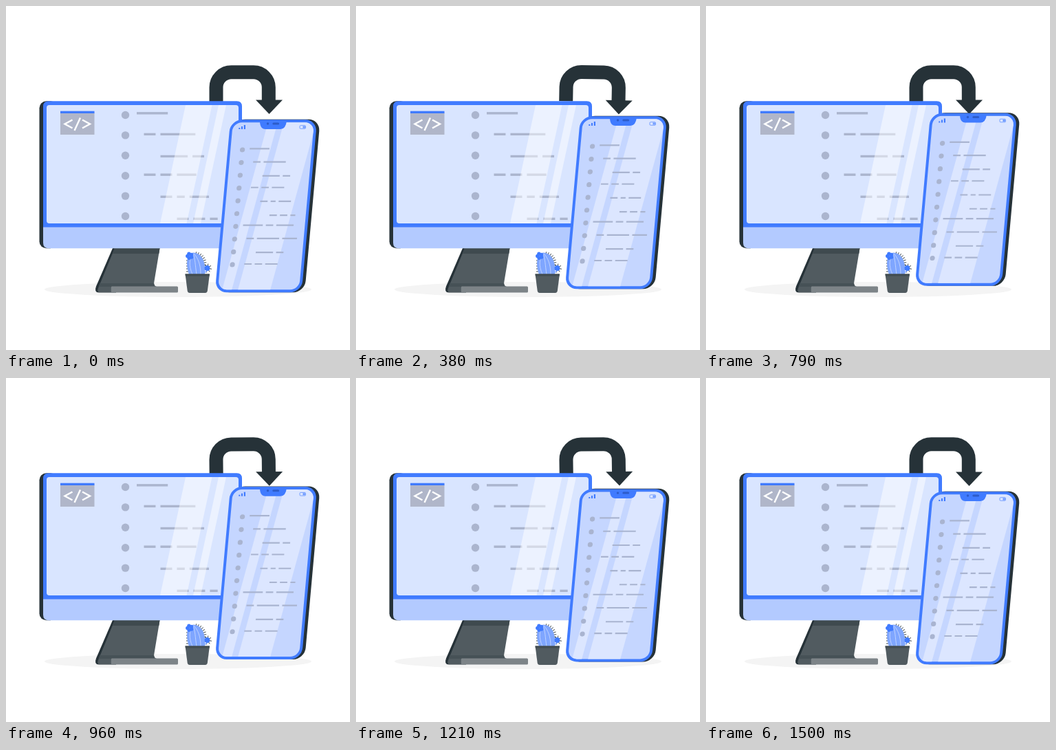
These frames come from a looping animation (500 px wide and 500 px high, 1.54 s). An HTML page:

```html
<!DOCTYPE html>
<html lang="en">
<head>
<meta charset="utf-8">
<title>Screen to phone</title>
<style>
  html, body { margin: 0; width: 100%; height: 100%; overflow: hidden; background: #fff; }
  svg { display: block; width: 100%; height: 100%; }
</style>
</head>
<body>
<svg viewBox="0 0 500 500">
  <defs>
    <clipPath id="screen"><rect x="59" y="144" width="279" height="172" rx="4"/></clipPath>
    <clipPath id="glass"><rect x="319" y="169.300" width="118" height="243" rx="13" transform="matrix(1 0 -.09 1 26.1 0)"/></clipPath>
  </defs>

  <ellipse cx="250" cy="412" rx="194" ry="11" fill="#f4f4f4"/>

  <g id="arrow" fill="#263238">
    <path d="M305.500 139V118.300a22 22 0 0 1 22-22H359.800a22 22 0 0 1 22 22V138" fill="none" stroke="#263238" stroke-width="20"/>
    <path d="M363 136.500H402L382.500 157Z"/>
  </g>

  <g id="stand">
    <path d="M155 352L131 407.500Q127.500 416.500 135 416.500H160V352Z" fill="#263238"/>
    <path d="M158 352H223.500L215 403Q215.500 407.500 219 408H152.500V416H136Q132 416 134 410Z" fill="#515b60"/>
    <path d="M158 352H223.500L222.300 360H154.800Z" fill="#3f4a4f"/>
    <path d="M136.500 403H215Q215.500 407.500 219 408H134.500Z" fill="#465156"/>
    <rect x="152.500" y="407.500" width="97.500" height="9" rx="1.500" fill="#7d8488"/>
  </g>

  <g id="monitor">
    <rect x="48.500" y="138.300" width="26" height="214" rx="10" fill="#263238"/>
    <path d="M54 318H343V352.300H62Q54 352.300 54 344Z" fill="#b3caff"/>
    <path d="M54 321.500V146Q54 138.200 62 138.200H335.500Q343 138.200 343 146V321.500Z" fill="#407bff"/>
    <g clip-path="url(#screen)">
      <rect x="59" y="144" width="279" height="172" fill="#d9e5ff"/>
      <g id="deskList" fill="#abb5ce" transform="translate(173.500 158.500)"/>
      <path d="M261 144H299.500L262.500 316H224ZM309 144H320L283 316H272Z" fill="#fff" opacity=".48"/>
    </g>
    <rect x="79" y="155" width="49.500" height="32" fill="#b0b6c9"/>
    <rect x="79" y="152.700" width="49.500" height="3.300" fill="#407bff"/>
    <path d="M96.500 165.500L85.500 171.500L96.500 177.500M108 162.500L99.500 181M111 165.500L122 171.500L111 177.500" fill="none" stroke="#fff" stroke-width="2.400"/>
  </g>

  <g id="plant">
    <g id="spikes" stroke="#263238" stroke-width=".9"/>
    <path d="M266 390C261 377 262 359 272.500 358.500C285 359 291 373 289 390Z" fill="#7fa6ff"/>
    <path d="M271 390C265 377 267 367 271 361M277 390C275 377 275 367 272 360M283 390C283 376 279 366 273 360" fill="none" stroke="#c5d6ff" stroke-width=".9"/>
    <path d="M289 387Q293 386 295 379" fill="none" stroke="#7fa6ff" stroke-width="1.300"/>
    <circle cx="292.500" cy="381" r="3.900" fill="#407bff"/>
    <g id="flower" fill="#407bff"/>
    <path d="M260.500 389.500H296L292.800 414Q292.300 417 289.500 417H267Q264.200 417 263.700 414Z" fill="#515b60"/>
    <path d="M260.500 389.500H296L295.600 392.500H260.900Z" fill="#414c51"/>
  </g>

  <g id="phone">
    <g transform="matrix(1 0 -.09 1 26.1 0)">
      <rect x="319.500" y="164.700" width="126" height="251.600" rx="17" fill="#263238"/>
      <rect x="315" y="165.300" width="126" height="251" rx="17" fill="#407bff"/>
    </g>
    <g clip-path="url(#glass)">
      <rect x="300" y="160" width="160" height="260" fill="#c5d6ff"/>
      <path d="M382 165H396L328 413H314ZM405 165H452L384 413H337Z" fill="#dce6ff"/>
    </g>
    <path d="M369 167H408Q406.500 179 399 179H377Q369 179 369 167Z" fill="#407bff"/>
    <g fill="#2d5cc9">
      <circle cx="380.500" cy="171" r="1.700"/>
      <rect x="387.300" y="169.500" width="9.800" height="3" rx="1.500"/>
    </g>
    <g fill="#407bff">
      <path d="M338.300 179v-2h2v2ZM342 179v-4h2v4ZM345.800 179v-6h2.200v6Z"/>
      <rect x="431.500" y="174.500" width="3.300" height="3" opacity=".7"/>
    </g>
    <rect x="427" y="173.700" width="8.500" height="4.600" rx="1.200" fill="none" stroke="#407bff" stroke-width=".8" opacity=".8"/>
    <g id="phoneList" fill="#a9b4d0" transform="matrix(.635 0 -.055 .631 343.6 209)"/>
  </g>
</svg>
<script>
const NS = 'http://www.w3.org/2000/svg';
const byId = id => document.getElementById(id);

function add(parent, tag, attrs) {
  const el = document.createElementNS(NS, tag);
  for (const key in attrs) el.setAttribute(key, attrs[key]);
  parent.append(el);
}

// Indent level, then word lengths in characters.
const CODE = '0:8 1:39 2:73 1:335 2:325 3:332 0:837 1:396 2:73 1:335'.split(' ');
const PITCH = 29.4, CHAR = 5.65, GAP = 7, LINE = 3.4;

// Both devices show the same listing; deeper lines sit a little lower.
function list(parent, count) {
  CODE.slice(0, count).forEach((line, i) => {
    const [level, words] = line.split(':');
    const indent = Math.max(0, 24 * level - 13.5);
    const cy = i * PITCH;
    const y = cy + (indent - 24) / 9 - LINE / 2;
    let x = 16.5 + indent;
    add(parent, 'circle', { cx: 0, cy, r: 5.7 });
    for (const n of words) {
      add(parent, 'rect', { x, y, width: n * CHAR, height: LINE });
      x += n * CHAR + GAP;
    }
  });
}
list(byId('deskList'), 6);
list(byId('phoneList'), 10);

function spike(x, y, angle, from, to) {
  const c = Math.cos(angle), s = Math.sin(angle);
  add(byId('spikes'), 'line', { x1: x + c * from, y1: y + s * from, x2: x + c * to, y2: y + s * to });
}
for (let i = 0; i < 8; i++) {
  spike(274.5, 374, -1.45 + i * 0.23, 12, 16.8);
  spike(292.5, 381, i * Math.PI / 4 + 0.2, 3, 6.6);
}
for (let i = 0; i < 5; i++) {
  const a = i * Math.PI * 2 / 5 + 0.6;
  spike(265, 370 + i * 4, Math.PI, 0, 3);
  add(byId('flower'), 'circle', { cx: 267 + 3.2 * Math.cos(a), cy: 363.3 + 3.2 * Math.sin(a), r: 2.7 });
}

const LOOP = 1540, CYCLE = 1500, STEP = 125 / 3;
const phone = byId('phone'), arrow = byId('arrow');

// Triangle wave: 0 at whole numbers, 1 halfway between.
const tri = p => 1 - Math.abs(1 - 2 * (p - Math.floor(p)));

function draw(now) {
  const p = Math.floor((now % LOOP + 4) / STEP) * STEP / CYCLE;
  const lift = -10 * tri(p);
  const sway = 2 * tri(p + 0.25) - 1;
  phone.setAttribute('transform', `translate(0 ${lift})`);
  arrow.setAttribute('transform', `rotate(${sway} 349 121.5)`);
}

let start;
function tick(now) {
  start ??= now;
  draw(now - start);
  requestAnimationFrame(tick);
}
draw(0);
requestAnimationFrame(tick);
</script>
</body>
</html>
```
